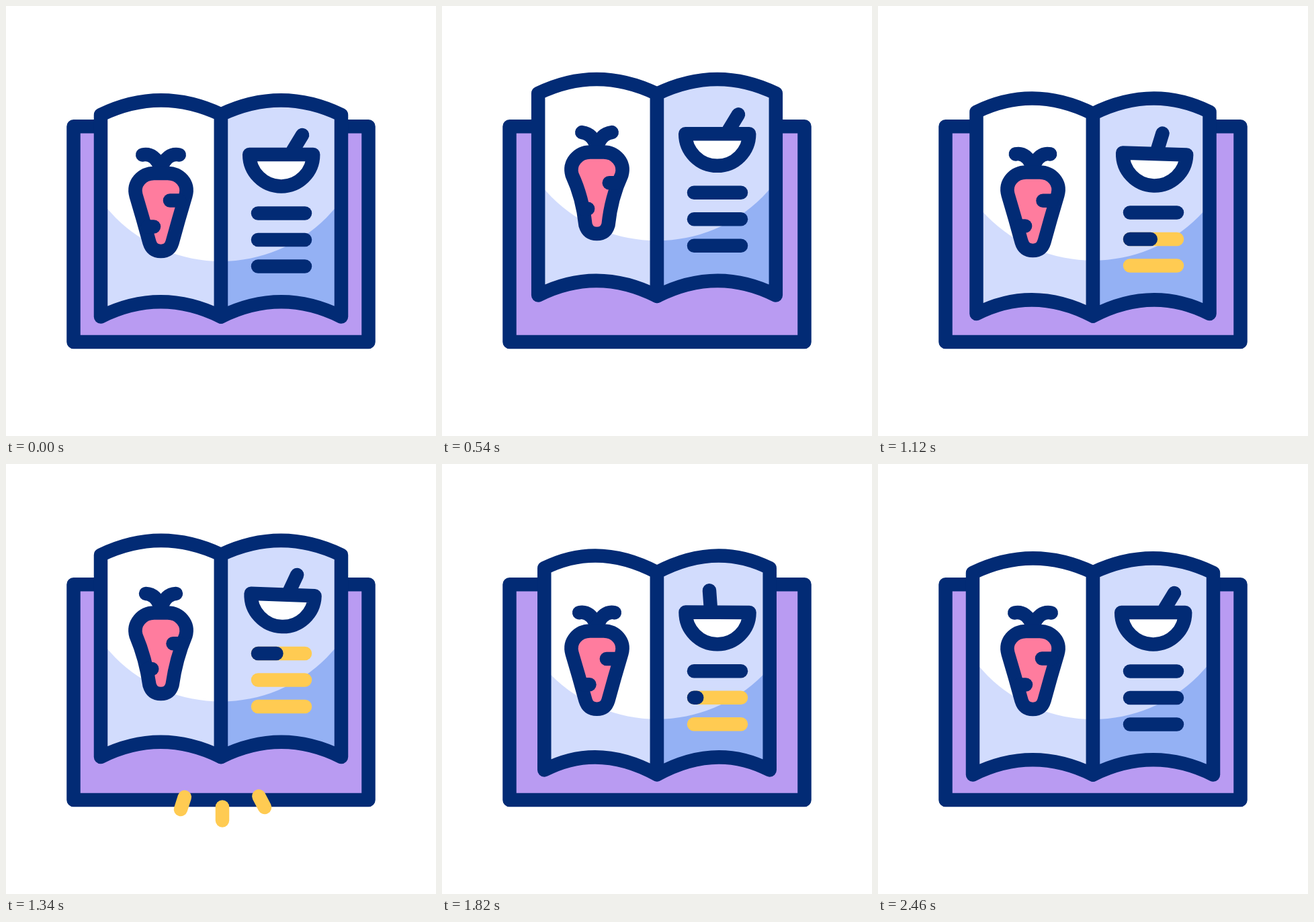
Write an HTML page with a canvas that moves like this. It is 640 px wide and 640 px high and loops after 2720 ms.

```html
<!DOCTYPE html>
<html lang="en">
<head>
<meta charset="utf-8">
<title>Recipe book</title>
<style>
html, body { margin: 0; width: 100%; height: 100%; overflow: hidden; background: #fff; }
canvas { display: block; width: 640px; height: 640px; }
</style>
</head>
<body>
<canvas id="stage" width="640" height="640"></canvas>
<script>
const ctx = document.getElementById('stage').getContext('2d');
const LOOP = 2720;
const NAVY = '#022b75', LILAC = '#b99bf2', PALE = '#d2dcfd', BLUE = '#94b1f4',
      PINK = '#ff7c9e', YELLOW = '#ffcb52', WHITE = '#fff';

const clamp = v => Math.min(1, Math.max(0, v));
const mix = (a, b, k) => a + (b - a) * k;
const ease = (t, start, end) => {
  const k = clamp((t - start) / (end - start));
  return k * k * (3 - 2 * k);
};
// Eased value through [time, value] keys.
const keyed = (t, keys) => keys.slice(1).reduce(
  (v, [time, next], i) => v + (next - keys[i][1]) * ease(t, keys[i][0], time), keys[0][1]);

function shape(d, fill, stroke = NAVY) {
  const path = new Path2D(d);
  if (fill) { ctx.fillStyle = fill; ctx.fill(path); }
  if (stroke) { ctx.strokeStyle = stroke; ctx.stroke(path); }
}
const line = (x1, y1, x2, y2, color = NAVY) => shape(`M${x1} ${y1}L${x2} ${y2}`, null, color);

function page(side, fold, light, dark) {
  const x = dx => 320 + side * dx;
  const edge = 179 - fold, mid = 90 - fold * 0.2, lift = fold * 0.6, bulge = fold * 0.33;
  const outline = `M320 161.5Q${x(mid)} ${119 - bulge} ${x(edge)} ${162 - lift}` +
    `V${462.5 - lift}Q${x(mid)} ${418 - bulge} 320 462.5Z`;
  ctx.save();
  ctx.clip(new Path2D(outline));
  shape('M0 0H640V640H0Z', dark, null);
  shape('M98 158A222 222 0 0 0 542 158V0H98Z', light, null);
  ctx.restore();
  shape(outline);
}

function carrot(hop) {
  const narrow = hop ** 0.35, stretch = hop ** 2;
  const x = dx => 230.5 + dx;
  for (const s of [-1, 1]) {
    const tip = x(s * mix(27.3, 22, narrow)), bend = x(s * mix(9, 4, stretch));
    shape(`M${tip} ${mix(221.5, 218, stretch)}Q${bend} ${mix(218, 222, stretch)} 230.5 242V249`);
  }
  const top = 249 - narrow, bottom = mix(365, 371, stretch);
  const waist = mix(26.5, 20, stretch), waistY = mix(317, 315, stretch);
  shape(`M${x(-10)} ${top}H${x(10)}C${x(28)} ${top} ${x(42)} 264 ${x(37)} 282` +
    `Q${x(waist)} ${waistY} ${x(17)} ${bottom - 13}Q${x(13)} ${bottom} ${x(0)} ${bottom}` +
    `Q${x(-13)} ${bottom} ${x(-17)} ${bottom - 13}Q${x(-waist)} ${waistY} ${x(-37)} 282` +
    `C${x(-42)} 264 ${x(-28)} ${top} ${x(-10)} ${top}Z`, PINK);
  const rightY = mix(289.5, 294, narrow), leftY = mix(328.5, 333.5, stretch);
  line(mix(244, 249, narrow), rightY, 258, rightY);
  line(mix(220, 217, narrow), leftY, 211, leftY);
}

function bowl(t) {
  const stir = keyed(t, [[540, 0], [880, -44], [1260, -6], [1880, -44], [2440, 0]]);
  const rock = t > 670 && t < 2190 ? -3.2 * Math.sin((t - 670) / 380 * Math.PI) : 0;
  line(441 + stir, 192 + stir * 0.08, 427 + stir * 0.63, 215);
  ctx.save();
  ctx.translate(409.7, 285);
  ctx.rotate(rock * Math.PI / 180);
  shape('M-47.5 -64H47.5A47.5 47.5 0 0 1 -47.5 -64Z', WHITE);
  ctx.restore();
}

function textLines(t) {
  [308.5, 348, 387.5].forEach((y, i) => {
    const start = 806 + 214 * (2 - i), end = start + 187;
    const length = 70 * (1 - ease(t, start, end) + ease(t, 3000 - end, 3000 - start));
    if (length < 69.9) line(375, y, 445, y, YELLOW);
    if (length > 0.1) line(375, y, 375 + length, y);
  });
}

function rays(t) {
  const head = ease(t, 0, 90), tail = ease(t, 30, 220);
  if (t <= 0 || tail >= 1) return;
  for (const [x1, y1, x2, y2] of [[274, 470, 260, 514], [322, 482, 322, 530.5], [364, 471, 385, 511]]) {
    line(mix(x1, x2, tail), mix(y1, y2, tail), mix(x1, x2, head), mix(y1, y2, head), YELLOW);
  }
}

function draw(t) {
  ctx.fillStyle = WHITE;
  ctx.fillRect(0, 0, 640, 640);
  ctx.lineWidth = 20.5;
  ctx.lineCap = ctx.lineJoin = 'round';

  shape('M100.5 179.3H539.5V500H100.5Z', LILAC);

  const hop = keyed(t, [[240, 0], [620, 1], [980, 0], [1080, 0], [1460, 1], [1840, 0]]);
  const sink = keyed(t, [[1840, 0], [2020, 1], [2220, 0]]);
  const fold = keyed(t, [[400, 0], [920, 12], [1300, 0], [1370, 0], [1900, 12], [2220, 0]]);
  ctx.save();
  ctx.translate(0, sink - 34.5 * hop);
  page(-1, fold, WHITE, PALE);
  page(1, fold, PALE, BLUE);
  carrot(clamp(hop));
  bowl(t);
  textLines(t);
  ctx.restore();

  rays(t - 1205);
  rays(t - 2050);
}

function tick() {
  draw(performance.now() % LOOP);
  requestAnimationFrame(tick);
}
tick();
</script>
</body>
</html>
```
